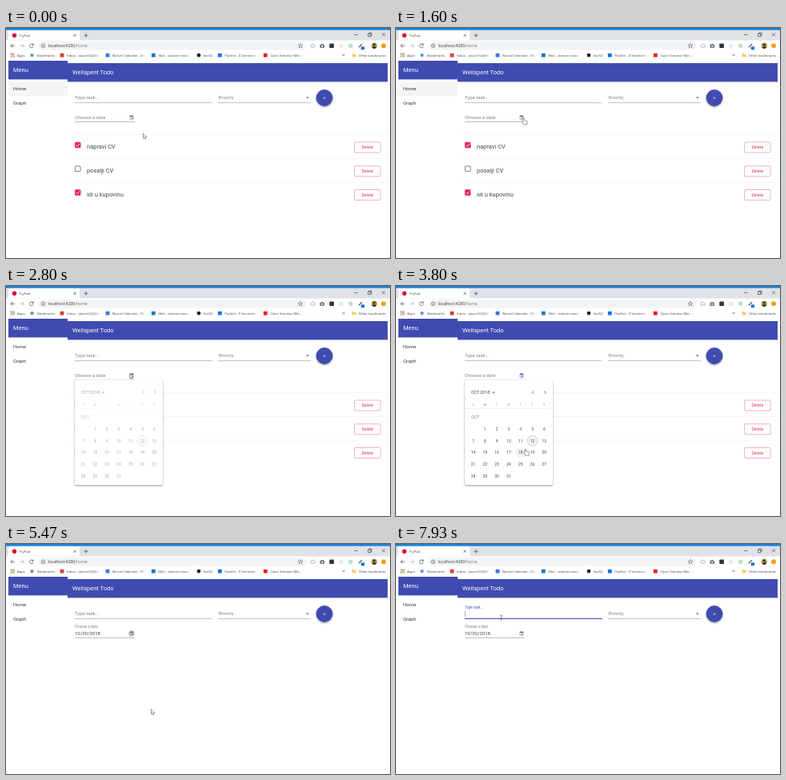
Write an HTML page that moves like this. It is 480 by 288 pixels and loops after 8 s.

```html
<!DOCTYPE html>
<html lang="en">
<head>
<meta charset="utf-8">
<title>Todo demo</title>
<style>
html, body { margin: 0; width: 100%; height: 100%; overflow: hidden; background: #fff; }
svg { display: block; }
text { font-family: Roboto, Arial, sans-serif; font-size: 6px; white-space: pre; }
.ui text { font-family: "Open Sans", "Noto Sans", sans-serif; font-size: 4.2px; fill: #444; }
.line { fill: none; stroke: #444; stroke-width: .7; }
.title { font-size: 7.5px; fill: #fff; }
.hint { fill: #808080; }
.rule { stroke: #949494; stroke-width: .6; }
.task { font-size: 7.5px; fill: #444; }
.delete { font-size: 5.25px; fill: #dc3545; text-anchor: middle; }
.day { font-size: 4.9px; fill: #444; text-anchor: middle; }
.week { font-size: 4.1px; fill: #9e9e9e; text-anchor: middle; }
</style>
</head>
<body>
<svg id="stage" width="480" height="288" viewBox="0 0 480 288">
  <defs>
    <linearGradient id="fade"><stop stop-color="#fff" stop-opacity="0"/><stop offset="1" stop-color="#fff"/></linearGradient>
    <filter id="shadow" x="-20%" y="-20%" width="140%" height="150%">
      <feDropShadow dx="0" dy="1.1" stdDeviation="1" flood-opacity=".4"/>
    </filter>
  </defs>

  <g class="ui">
    <rect width="480" height="15.5" fill="#dfe3e8"/>
    <rect width="480" height="2.6" fill="#1a82d8"/>
    <path d="M1 15.5Q3 15.5 3 13V5Q3 3 5 3H90Q92 3 92 5V13Q92 15.5 94 15.5Z" fill="#fff"/>
    <circle cx="10.5" cy="9.3" r="2.7" fill="#dd0031"/>
    <text x="16.5" y="11" style="font-size:4.3px">TryPad</text>
    <path class="line" d="M84.5 7.8l3 3m0-3l-3 3M97.5 9.3h5m-2.5-2.5v5M435 8.5h4.5M452.5 7.2h3.4v3.4h-3.4zM453.6 7.2v-1.1h3.4v3.4h-1.1M470 6.3l4 4m0-4l-4 4"/>
    <path class="line" d="M11 22.2H6m2.4-2.4L6 22.2l2.4 2.4"/>
    <path class="line" style="stroke:#aaa" d="M17.5 22.2h5m-2.4-2.4l2.4 2.4-2.4 2.4"/>
    <path class="line" d="M33.8 20.8A2.4 2.4 0 1 0 34.2 23M34.2 19.4v1.9h-1.9"/>
    <rect x="41" y="17" width="334" height="10.4" rx="5.2" fill="#f1f3f4"/>
    <circle cx="46.5" cy="22.2" r="2.2" class="line" style="stroke-width:.6"/>
    <path class="line" style="stroke-width:.6" d="M46.5 21.9v1.4m0-2.5v.5"/>
    <text x="52.5" y="24" style="font-size:5px;fill:#333">localhost:4200<tspan fill="#777">/home</tspan></text>
    <path id="star" class="line" style="stroke-width:.5" d="M368 19.4l.8 1.9 2 .1-1.6 1.3.6 2-1.8-1.1-1.8 1.1.6-2-1.6-1.3 2-.1z"/>
    <path class="line" style="stroke:#8d93b8" d="M381.7 24h3.6a1.3 1.3 0 0 0 0-2.6 2 2 0 0 0-3.8.3 1.2 1.2 0 0 0 .2 2.3z"/>
    <path d="M392.5 20.8h1.3l.6-.9h1.6l.6.9h1.3v3.9h-5.4z" fill="#666"/><circle cx="395.2" cy="22.7" r="1.1" fill="#fff"/>
    <rect x="404.3" y="19.5" width="5.6" height="5.6" rx=".8" fill="#333"/>
    <rect x="416.3" y="19.7" width="5" height="5" rx=".8" fill="#e8eaec"/>
    <rect x="428.3" y="19.7" width="5" height="5" rx=".8" fill="#b5e2c3"/>
    <path class="line" style="stroke-width:1.2" d="M441 24.2l4-4"/>
    <rect x="443.7" y="23.3" width="4.5" height="4" rx=".7" fill="#2673dd"/>
    <circle cx="460.3" cy="22.2" r="3.6" fill="#b39a45"/>
    <path d="M457.7 24.6a2.7 2.2 0 0 1 5.2 0 3.6 3.6 0 0 1-5.2 0z" fill="#302c22"/><circle cx="460.3" cy="21" r="1.4" fill="#302c22"/>
    <circle cx="472" cy="22.2" r="3" fill="#f3a01c"/>
    <g id="marks"></g>
    <path class="line" style="stroke-width:.6" d="M420.5 32.8l1.2 1.2-1.2 1.2m1.6-2.4l1.2 1.2-1.2 1.2"/>
    <path d="M432.5 32h2l.6.7h2.6v3.5h-5.2z" fill="#f2cf66"/>
    <text x="440.7" y="35.7">Other bookmarks</text>
  </g>

  <rect x="3" y="41" width="74" height="23.4" fill="#3f4bb0"/>
  <rect x="77" y="44" width="400" height="23.4" fill="#3f4bb0"/>
  <text class="title" x="9" y="55.4">Menu</text>
  <text class="title" x="83" y="58.4">Wellspent Todo</text>
  <rect id="homeBg" x="3" y="67.5" width="74" height="17.8" fill="#f5f5f5"/>
  <text x="9" y="78.3" fill="#333">Home</text>
  <text x="9" y="96.2" fill="#333">Graph</text>

  <path class="rule" d="M86 93.6H257.5M265 93.6H381M86 117.5H161"/>
  <text id="typeLabel" x="86" class="hint">Type task...</text>
  <path id="focusLine" stroke="#3f4bb0" stroke-width="1"/>
  <path id="caret" d="M86.4 84v6.6" stroke="#3f4bb0" stroke-width=".5"/>
  <text x="265.5" y="89.4" class="hint">Priority</text>
  <path d="M374.8 86.6h4l-2 2z" fill="#666"/>
  <circle cx="398" cy="87.5" r="10.4" fill="#3f4bb0" filter="url(#shadow)"/>
  <path d="M396.7 87.7h2.6m-1.3-1.3v2.6" stroke="#fff" stroke-width=".6"/>
  <text id="dateLabel" x="86" class="hint">Choose a date</text>
  <text id="dateValue" x="86" y="113.7" fill="#444">10/20/2018</text>
  <circle id="iconFocus" cx="157" cy="112" r="4.4" fill="#000" fill-opacity=".13"/>
  <g id="dateIcon" stroke="currentColor" stroke-width=".5">
    <path d="M155 110.2h4v4.1h-4z" fill="none"/>
    <path d="M155 110.2h4v.7h-4zM155.9 109.4v.8M158.1 109.4v.8M157.3 112.5h.8v.8h-.8z" fill="currentColor"/>
  </g>

  <g id="tasks"></g>

  <g id="popup">
    <rect x="86" y="117.2" width="110" height="131.8" rx="1.5" fill="#fff" filter="url(#shadow)"/>
    <g id="calendar">
      <text x="94" y="135.2" style="font-size:5.25px;fill:#444">OCT 2018</text>
      <path d="M120 132.7h3.6l-1.8 1.8z" fill="#666"/>
      <path class="line" d="M172.2 131.4l-2 2 2 2M185.3 131.4l2 2-2 2"/>
      <path d="M86 153.4h110" stroke="#e0e0e0" stroke-width=".5"/>
      <text x="94" y="165.7" class="hint" style="font-size:5.25px">OCT</text>
      <circle id="hover" r="6.5"/>
      <circle cx="170.5" cy="193.8" r="6.4" fill="#000" fill-opacity=".05" stroke="#ababab" stroke-width=".5"/>
      <g id="days"></g>
    </g>
  </g>

  <g id="cursor" stroke="#444" stroke-width=".55" fill="#fff">
    <path id="arrow" d="M0 0V6l1.4-1.3 1 2.3 1-.4-1-2.2h1.9z"/>
    <path id="hand" d="M-.8.8Q0-.5.8.8V3.2l3 .7Q4.7 4.2 4.5 5.3L4 8.3H-.2L-2 5.4Q-2.4 4.3-.8 4.8Z"/>
    <path id="beam" d="M-1.5-3Q0-3 0-2.3Q0-3 1.5-3M0-2.3V2.3M-1.5 3Q0 3 0 2.3Q0 3 1.5 3" fill="none"/>
  </g>
</svg>
<script>
const $ = id => document.getElementById(id);
const clamp = v => Math.max(0, Math.min(1, v));
const span = (t, from, to) => clamp((t - from) / (to - from));
const easeOut = k => 1 - (1 - k) ** 3;
const smooth = k => k * k * (3 - 2 * k);
const show = (id, opacity) => $(id).setAttribute('opacity', +opacity);

// Bookmarks: icon x, label, icon colour, round icon
const marks = [
  [70, 'Inbox - tavorn52@fel', '#d93f35'],
  [127, 'Norvel Calendar - We', '#3b78e0'],
  [184.3, 'Mail - stanimir.tavo', '#1677c8'],
  [241, 'kov52', '#222', true],
  [267.3, 'Packlet - X Semester', '#1473e6'],
  [324.3, 'Open Seminar Mar, 20', '#f01c1c']
];
let html = '';
const hues = ['#e04a3f', '#4caf50', '#4285f4', '#f4b400'];
for (let i = 0; i < 9; i++)
  html += `<rect x="${5.7 + i % 3 * 1.8}" y="${31.6 + (i / 3 | 0) * 1.8}" width="1.3" height="1.3" fill="${hues[i % 4]}"/>`;
html += `<text x="14" y="35.7">Apps</text><text x="39" y="35.7">Bookmarks</text>
  <path d="${$('star').getAttribute('d').replace('M368 19.4', 'M32.5 31.2')}" fill="#3b82e8"/>`;
for (const [x, label, color, round] of marks)
  html += `<rect x="${x - 2.4}" y="31.7" width="4.8" height="4.8" rx="${round ? 2.4 : .5}" fill="${color}"/>
    <svg x="${x + 6}" y="29" width="41.5" height="10"><text y="6.7">${label}</text>
    <rect x="35" width="6.5" height="10" fill="url(#fade)"/></svg>`;
$('marks').innerHTML = html;

$('tasks').innerHTML = [['napravi CV', 1], ['posalji CV', 0], ['idi u kupovinu', 1]].map(([name, done], i) =>
  `<g transform="translate(0 ${i * 29.75})">
    <path d="M80 133.7H477" stroke="#eee" stroke-width=".6"/>
    <rect x="86.4" y="143.2" width="6.6" height="6.6" rx=".4" stroke-width=".8"
      fill="${done ? '#e91e63' : '#fff'}" stroke="${done ? '#e91e63' : '#666'}"/>
    ${done ? '<path d="M87.5 146.6l1.6 1.6 3-3.4" fill="none" stroke="#fff" stroke-width=".9"/>' : ''}
    <text class="task" x="101" y="151.4">${name}</text>
    <rect x="435.6" y="143" width="32.4" height="13" rx="1.2" fill="#fff" stroke="#e4808a" stroke-width=".6"/>
    <text class="delete" x="451.8" y="151.4">Delete</text>
  </g>`).join('');

const dayX = d => 96.5 + d % 7 * 14.8;
const dayY = d => 179 + (d / 7 | 0) * 14.83;
html = [...'SMTWTFS'].map((c, i) => `<text class="week" x="${dayX(i)}" y="149.6">${c}</text>`).join('');
for (let d = 1; d <= 31; d++)
  html += `<text class="day" id="day${d}" x="${dayX(d)}" y="${dayY(d) + 1.8}">${d}</text>`;
$('days').innerHTML = html;

// Cursor stops: time, x, y
const path = [
  [0, 171.5, 132], [870, 171.5, 132], [1130, 165.5, 120], [1270, 165.5, 120], [1330, 159.5, 112.5],
  [1600, 159.5, 112.5], [1930, 154.8, 110], [3440, 154.8, 110], [3780, 162, 203.8],
  [3950, 162, 203.8], [4250, 175.5, 206], [4300, 175.5, 206], [4530, 181.5, 207],
  [6350, 181.5, 207], [6530, 280, 92.5], [6620, 280, 92.5], [6870, 147.5, 94.5],
  [7070, 147.5, 94.5], [7200, 136, 95], [7620, 136, 95], [7900, 131.5, 92.2], [8000, 131.5, 92.2]
];
const OPEN = 2450, PICK = 4870, FOCUS = 7660;

function cursorAt(t) {
  const i = path.findIndex(p => p[0] > t);
  const [t0, x0, y0] = path[i - 1], [t1, x1, y1] = path[i];
  const k = smooth(span(t, t0, t1));
  return [x0 + (x1 - x0) * k, y0 + (y1 - y0) * k];
}

function floatLabel(id, k, low, high) {
  $(id).style.fontSize = 6 - 1.5 * k + 'px';
  $(id).setAttribute('y', low + (high - low) * k);
}

function draw(t) {
  const [x, y] = cursorAt(t);
  const picked = t >= PICK;
  const col = Math.round((x - 96.5) / 14.8), row = Math.round((y - 179) / 14.83);
  const day = row * 7 + col;
  const onDay = t >= OPEN && !picked && row >= 0 && day > 0 && day < 32;
  const onIcon = t >= 1310 && t < OPEN;
  const kind = t >= 7130 ? 'beam' : onIcon || onDay ? 'hand' : 'arrow';
  $('cursor').setAttribute('transform', `translate(${x} ${y})`);
  for (const id of ['arrow', 'hand', 'beam']) show(id, id === kind);

  show('homeBg', 1 - span(t, 2100, 2250));
  show('tasks', !picked);
  show('iconFocus', t >= 2250 && t < 7470 && (t < OPEN || picked));
  $('dateIcon').style.color = t >= OPEN && !picked ? '#3f4bb0' : '#606060';

  // Date picker
  const grow = easeOut(span(t, OPEN, OPEN + 260));
  show('popup', grow * (1 - span(t, PICK, PICK + 130)));
  $('popup').setAttribute('transform', `translate(0 117) scale(1 ${grow}) translate(0 -117)`);
  show('calendar', span(t, 2570, 3060));
  show('hover', onDay || picked);
  $('hover').setAttribute('cx', dayX(day));
  $('hover').setAttribute('cy', dayY(day));
  $('hover').setAttribute('fill', picked ? '#3f4bb0' : '#f3f3f3');
  $('day20').style.fill = picked ? '#fff' : '#444';
  floatLabel('dateLabel', easeOut(span(t, PICK, PICK + 350)), 113.7, 104.6);
  show('dateValue', picked);

  // Task field
  const focus = easeOut(span(t, FOCUS, FOCUS + 240));
  floatLabel('typeLabel', focus, 89.4, 80.8);
  $('typeLabel').style.fill = t >= FOCUS ? '#3f4bb0' : '#808080';
  const half = 86 * (.5 + focus / 2);
  $('focusLine').setAttribute('d', `M${171.75 - half} 93.5h${half * 2}`);
  show('focusLine', focus);
  show('caret', t >= FOCUS);
}

const start = performance.now();
function tick() {
  draw((performance.now() - start) % 8000);
  requestAnimationFrame(tick);
}
tick();
</script>
</body>
</html>
```
